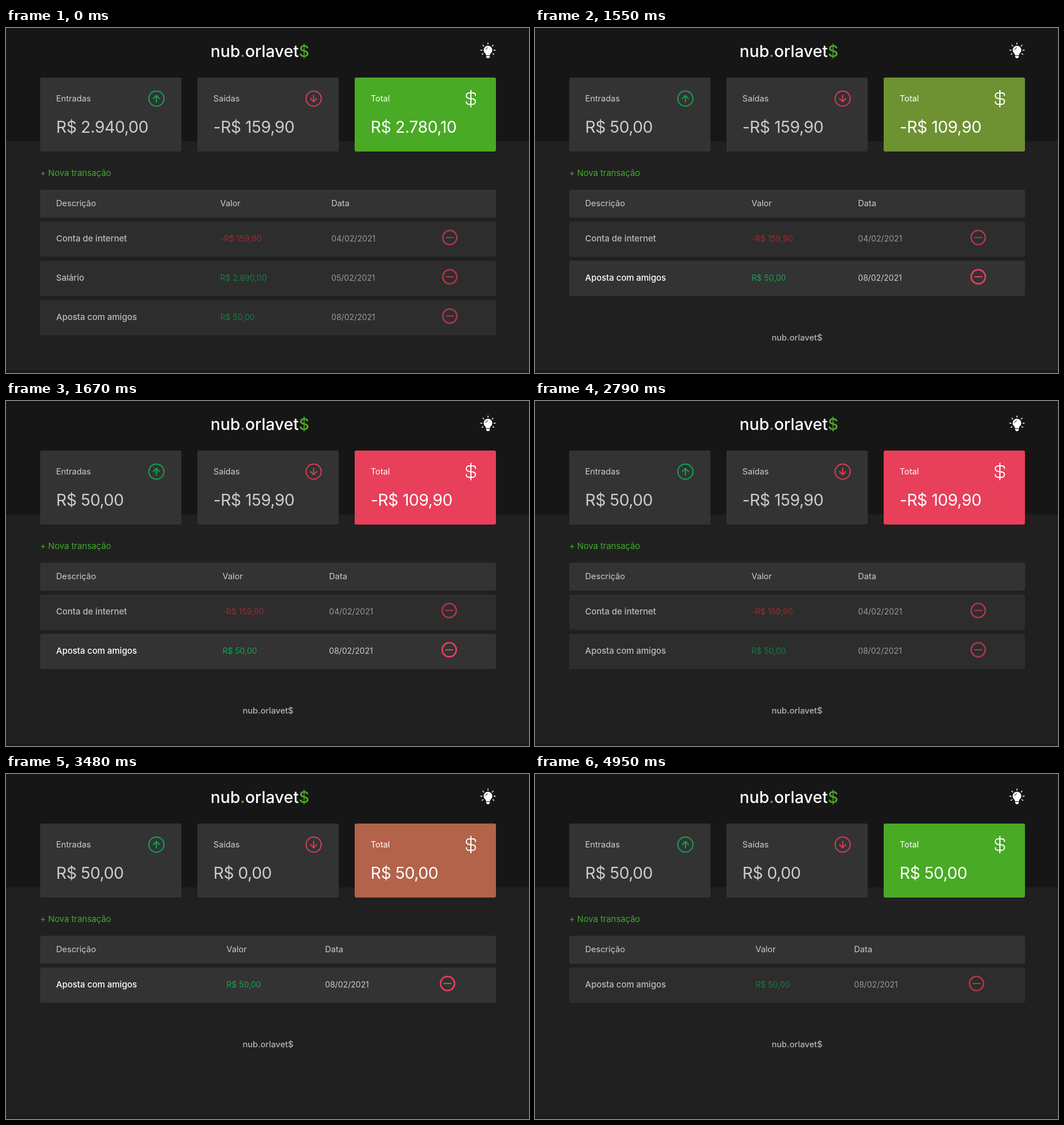
An HTML page for the animation above (5.29 s loop, 918 by 606 pixels).

```html
<!DOCTYPE html>
<html lang="pt-BR">
<head>
<meta charset="utf-8">
<title>Finanças</title>
<style>
  html, body { margin: 0; width: 100%; height: 100%; overflow: hidden; background: #202020; }
  svg { display: block; font: 14.7px Inter, "Open Sans", sans-serif; font-optical-sizing: none; }
  text { white-space: pre; }
  .label { fill: #ccc; }
  .sum { font-size: 28.5px; letter-spacing: -.45px; fill: #ccc; }
  .total { fill: #fff; }
  .brand { font-size: 28.6px; font-weight: 500; fill: #fff; }
  .accent { fill: #49aa26; }
  .link { font-size: 14.9px; fill: #3fab29; }
  .name { font-size: 15px; font-weight: 500; fill: #fff; }
  .value { font-size: 14.2px; letter-spacing: -.05px; }
  .date { font-size: 14.1px; fill: #ccc; }
  .foot { font-weight: 500; fill: #b4b4b4; text-anchor: middle; }
  .icon { fill: none; stroke-linecap: round; stroke-linejoin: round; }
</style>
</head>
<body>
<svg id="stage" width="918" height="606" viewBox="0 0 918 606"></svg>
<script>
const LOOP = 5290, FADE = 150;
const GREEN = [73, 170, 38], RED = [232, 63, 91];
const INCOME = '#12a454', EXPENSE = '#d0303a', ALERT = '#e83f5b';
const stage = document.getElementById('stage');

function add(tag, attrs, parent = stage, content = '') {
  const el = document.createElementNS('http://www.w3.org/2000/svg', tag);
  set(el, attrs);
  el.textContent = content;
  return parent.appendChild(el);
}
function set(el, attrs) {
  for (const key in attrs) el.setAttribute(key, attrs[key]);
}
const box = (x, y, width, height, fill, rx = 0, parent = stage) =>
  add('rect', { x, y, width, height, fill, rx }, parent);
const label = (x, y, kind, content, parent = stage) =>
  add('text', { x, y, class: kind }, parent, content);
const line = (d, stroke, width = 2, parent = stage) =>
  add('path', { d, stroke, class: 'icon', 'stroke-width': width }, parent);
const ring = (r, stroke, width, parent) =>
  add('circle', { r, stroke, class: 'icon', 'stroke-width': width }, parent);

// Header
box(0, 0, 918, 606, '#202020');
box(0, 0, 918, 199, '#161616');
const brand = label(359, 51, 'brand', '');
[['nub', ''], ['.', 'accent'], ['orlavet', ''], ['$', 'accent']].forEach(
  ([part, kind]) => add('tspan', { class: kind }, brand, part));

// Light bulb
add('path', {
  fill: '#fff',
  d: 'M846 31.2a7.5 7.5 0 0 0-5 13.1q1.5 1.4 1.7 3.7h6.6q.2-2.3 1.7-3.7a7.5 7.5 0 0 0-5-13.1z' +
     'M842.8 49h6.4v2l-2 2h-2.4l-2-2z'
});
line('M841.8 38.2a4.3 4.3 0 0 1 3.7-3.6', '#161616', 1);
for (const turn of [-125, -90, -45, 0, 45, 90, 125])
  set(line('M846 28.6v-2.4', '#fff', 1.4), { transform: `rotate(${turn} 846 39)` });

// Summary cards
const cards = ['Entradas', 'Saídas', 'Total'].map((title, i) => {
  const x = 60 + 276 * i, kind = i === 2 ? ' total' : '';
  return {
    panel: box(x, 87, 248, 130, '#333', 3),
    title: label(x + 28, 129, 'label' + kind, title),
    sum: label(x + 28, 184, 'sum' + kind, '')
  };
});
function arrow(x, color, turn) {
  const g = add('g', { transform: `translate(${x} 124) rotate(${turn})` });
  ring(13.3, color, 2, g);
  line('M0 5.8V-5.5M-5.4 0L0-5.6L5.4 0', color, 2, g);
}
arrow(264, INCOME, 0);
arrow(540, '#dc3b55', 180);
line('M816 109.5V138.5M824 118.5V118C824 115.5 822 114 819.5 114H812.5C810 114 808 116 808 118.8' +
     'C808 121.5 809.5 123 812 123.5L820 124.8C822.5 125.3 824 126.8 824 129.3' +
     'C824 132 822 134 819.5 134H812.5C810 134 808 132.3 808 130V129.5', '#fff');

// Table
label(60, 260, 'link', '+ Nova transação');
box(60, 284, 800, 49, '#333', 3);
label(88, 313, 'label', 'Descrição');
const valueHead = label(376, 313, 'label', 'Valor');
const dateHead = label(571, 313, 'label', 'Data');

const rows = [
  ['Conta de internet', '-R$ 159,90', '04/02/2021', EXPENSE],
  ['Salário', 'R$ 2.890,00', '05/02/2021', INCOME],
  ['Aposta com amigos', 'R$ 50,00', '08/02/2021', INCOME]
].map(([name, value, date, color]) => {
  const g = add('g', {});
  box(60, 0, 800, 62, '#333', 3, g);
  label(88, 35, 'name', name, g);
  const row = { g, value: label(0, 35, 'value', value, g), date: label(0, 35, 'date', date, g) };
  set(row.value, { fill: color });
  row.remove = add('g', {}, g);
  ring(12.3, ALERT, 2.8, row.remove);
  line('M-6.3 0H6.3', ALERT, 2, row.remove);
  return row;
});
const foot = label(460, 549, 'foot', 'nub.orlavet$');
box(0, 602, 918, 4, '#1c191d');

const ledgers = [
  { rows: [0, 1, 2], cols: [376, 571, 779], sums: ['R$ 2.940,00', '-R$ 159,90', 'R$ 2.780,10'] },
  { rows: [0, 2], cols: [380, 567, 778], sums: ['R$ 50,00', '-R$ 159,90', '-R$ 109,90'] },
  { rows: [2], cols: [387, 560, 775], sums: ['R$ 50,00', 'R$ 0,00', 'R$ 50,00'] }
];
// [start ms, ledger, hovered row]
const steps = [
  [0, 0, -1], [940, 0, 1], [1470, 1, 2], [2790, 1, -1],
  [2820, 1, 0], [3440, 2, 2], [4950, 2, -1]
];

function show([, index, hovered]) {
  const { rows: kept, cols: [valueX, dateX, iconX], sums } = ledgers[index];
  cards.forEach((card, i) => card.sum.textContent = sums[i]);
  set(valueHead, { x: valueX });
  set(dateHead, { x: dateX });
  rows.forEach((row, i) => {
    const place = kept.indexOf(i);
    set(row.g, {
      display: place < 0 ? 'none' : 'inline',
      transform: `translate(0 ${340 + 69 * place})`,
      opacity: i === hovered ? 1 : .7
    });
    set(row.value, { x: valueX });
    set(row.date, { x: dateX });
    set(row.remove, { transform: `translate(${iconX} 28)` });
  });
  set(foot, { y: 411 + 69 * kept.length });
}

// The CSS "ease" curve, solved by bisection
function ease(x) {
  if (x <= 0 || x >= 1) return x <= 0 ? 0 : 1;
  const curve = (a, b, s) => 3 * (1 - s) ** 2 * s * a + 3 * (1 - s) * s * s * b + s ** 3;
  let low = 0, high = 1;
  for (let i = 0; i < 20; i++) {
    const mid = (low + high) / 2;
    if (curve(.25, .25, mid) < x) low = mid; else high = mid;
  }
  return curve(.1, 1, low);
}

const start = performance.now();
let current;
function draw(now) {
  const t = Math.max(0, now - start) % LOOP;
  const step = steps.findLast(s => s[0] <= t);
  if (step !== current) show(current = step);
  const red = ease((t - 1525) / FADE) - ease((t - 3448) / FADE);
  const mix = GREEN.map((c, i) => Math.round(c + (RED[i] - c) * red));
  set(cards[2].panel, { fill: `rgb(${mix})` });
  requestAnimationFrame(draw);
}
draw(start);
</script>
</body>
</html>
```
